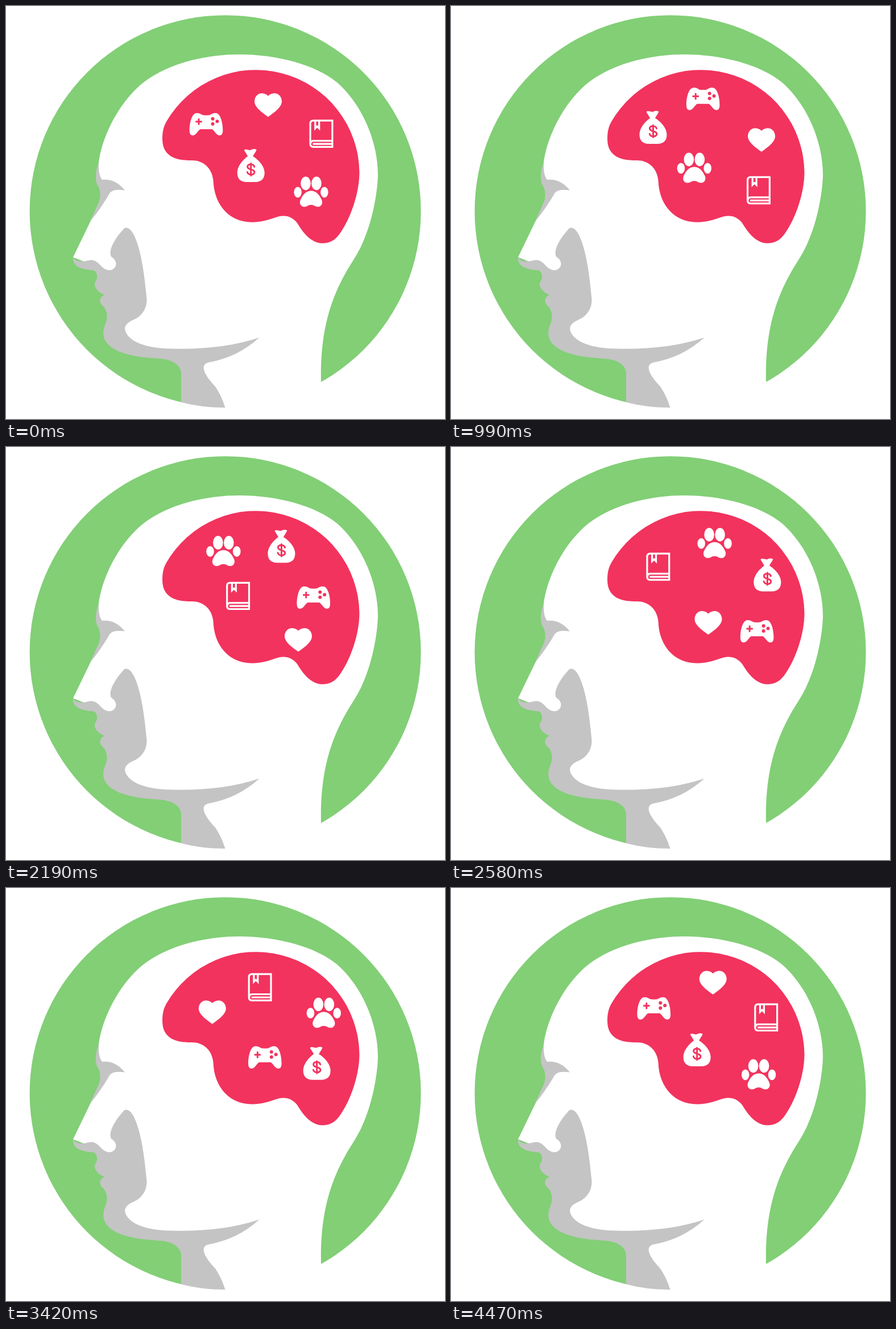
These frames come from a looping animation (772x725 px, 4.5 s). An HTML page:

```html
<!DOCTYPE html>
<html lang="en">
<head>
<meta charset="utf-8">
<title>Thoughts</title>
<style>
html, body { margin: 0; width: 100%; height: 100%; overflow: hidden; background: #fff; }
svg { display: block; width: 100vw; height: 100vh; }
.green { fill: #82cf76; }
.grey { fill: #c4c4c4; }
.pink { fill: #f2335e; }
.white { fill: #fff; }
.line { fill: none; stroke: #fff; stroke-width: 3.2; }
.cut { fill: none; stroke: #f2335e; stroke-width: 3; stroke-linecap: round; }
</style>
</head>
<body>
<svg viewBox="0 0 772 725">
  <circle class="green" cx="385.6" cy="360.2" r="344"/>

  <!-- head; the shadows finish its profile -->
  <path class="white" d="M554 725V660C552 570 571 508 609 449C643 400 654 325 654 295
    C653 229 621 168 582 134C540 100 470 85 410 85C350 85 285 101 242 134C195 171 167 237 163 275
    V300L168 335L149 377L118 441L170 462L200 540V598L300 612L312 640V725Z"/>

  <!-- shadows -->
  <path class="grey" d="M163 275C157 290 156 308 162 316C167 325 166 337 164 343L148 378
    C160 364 173 345 182 329C187 322 197 322 209 323.5C198 310 185 303 169 305C163 298 163 285 163 275Z"/>
  <path class="grey" d="M118 441C122 449 132 450 143 447C158 443 163 453 170 459
    C178 466 188 465 192 458C196 450 191 444 185 440C181 432 186 420 193 409C199 400 203 396 208 390
    C214 387 220 392 225 402C238 428 244 475 247.500 515C248 532 238 545 224 551C212 556 207 563 210 571
    C217 590 248 601 290 601.500C350 603 400 597 445.500 582C420 605 390 620 355 626
    C342 630 346 645 368 668C376 680 381 691 385.500 705C358 705 332 702 308 695.500V645
    C308 632 295 620 268 619C240 617 201 613 183 597C170 586 169 574 174 560C179 549 179 538 172 528
    C163 522 163 512 173 507C160 501 153 492 157 484C162 478 161 467 154 464C140 463 116 460 118 441Z"/>

  <!-- brain -->
  <path class="pink" d="M282 203A182 182 0 0 1 621.500 292C621.500 328 606 374 586 401
    C577 413 567 416.500 556 416.500C536 416 522 397 514 384C507 372 496 368 487 368.500
    C477 369 473 372 465 374C453 378 443 379.500 431 379.500C395 379 366 352 364.500 306
    C362 284 347 271 327 271C300 271.500 275 265 275 233C275 221 277 212 282 203Z"/>

  <g id="game">
    <path class="white" d="M-17 -19.500C-13 -20 -10 -18.500 -7 -16.500C-3.500 -15.300 3.500 -15.300 7 -16.500
      C10 -18.500 13 -20 17 -19.500C26 -19 29.300 0 29.300 10C29.300 16 28 19.700 23.500 19.700
      C18 19.700 15 12 10.500 8.800H-10.500C-15 12 -18 19.700 -23.500 19.700
      C-28 19.700 -29.300 16 -29.300 10C-29.300 0 -26 -19 -17 -19.500Z"/>
    <path class="cut" stroke-width="4" d="M-17.500 -4.500H-8.500M-13 -9V0"/>
    <g class="pink">
      <circle cx="11.500" cy="-9.500" r="3"/>
      <circle cx="19.400" cy="-5" r="3"/>
      <circle cx="11.500" cy="-.6" r="3"/>
    </g>
  </g>

  <g id="heart">
    <path class="white" d="M0 20.700C-6 16 -24 5 -24 -6.500C-24 -15 -18 -20.700 -11.500 -20.700
      C-6.500 -20.700 -2 -18.500 0 -16C2 -18.500 6.500 -20.700 11.500 -20.700
      C18 -20.700 24 -15 24 -6.500C24 5 6 16 0 20.700Z"/>
  </g>

  <g id="book" class="line">
    <path d="M19.400 23.100V-23.100H-14Q-19.400 -23.100 -19.400 -17.500V17.500Q-19.400 23.100 -14 23.100Z"/>
    <path d="M-19 18Q-19 12.300 -14 12.300H20M-15 17.800H20M-10.700 -23V-9.500L-7.200 -13L-3.800 -9.500V-23"/>
  </g>

  <g id="paw" class="white">
    <ellipse cx="-9.500" cy="-14.600" rx="8.800" ry="11.900"/>
    <ellipse cx="9.500" cy="-14.600" rx="8.800" ry="11.900"/>
    <ellipse cx="-23.400" cy=".8" rx="6.800" ry="9.400"/>
    <ellipse cx="23.400" cy=".8" rx="6.800" ry="9.400"/>
    <path d="M0 -1.500C9 -1.500 14 5 18 13C22 20 18 26.500 12 26.500C7 26.500 5 23 0 23
      C-5 23 -7 26.500 -12 26.500C-18 26.500 -22 20 -18 13C-14 5 -9 -1.500 0 -1.500Z"/>
  </g>

  <g id="bag">
    <path class="white" d="M-12 -27C-9 -30 -5 -27 -1 -27C3 -29 6 -30 10 -27.500C8 -23 5 -20 3.500 -16
      C11 -12 24 0 24 13C24 24 17 29 8 29H-8C-17 29 -24 24 -24 13C-24 0 -12 -12 -5.500 -16
      C-7 -20 -10 -23 -12 -27Z"/>
    <path class="cut" d="M6 2.200C5 -3.200 -6 -3.600 -6 2C-6 8.500 6.300 5.300 6.300 11.800
      C6.300 17.600 -5.600 17.200 -6.300 11.500M0 -3.700V17.700"/>
  </g>
</svg>
<script>
const LOOP = 4500, STEP = 30, LEG = 900, BEND = 0.6;

// Six stops per icon, one leg of time apart
const stops = {
  game: [[352, 207.5], [440.3, 162.8], [523.5, 215.5], [536, 326], [444, 290], [356.5, 211]],
  heart: [[461, 174], [544.6, 232.4], [547, 336], [447, 305], [362, 209], [461, 166]],
  book: [[554.5, 224.3], [542.6, 322.4], [456.2, 296], [364, 206.5], [459, 175], [554.5, 227.3]],
  paw: [[536.5, 326], [431, 286], [348.6, 207.5], [470, 169], [564, 228.5], [541, 327.3]],
  bag: [[430.7, 280], [355.5, 215], [426, 156.5], [560, 229], [539, 312], [432.3, 284]]
};

const ease = f => f * f * (3 - 2 * f);

// Tangent at a stop: follows its neighbours, or the leg itself at both ends
function slope(pts, i, k) {
  const a = pts[i - 1], b = pts[i], c = pts[i + 1];
  if (!a) return c[k] - b[k];
  if (!c) return b[k] - a[k];
  return BEND * (c[k] - a[k]);
}

// Cubic Hermite curve from stop i to the next
function along(pts, i, u, k) {
  const v = 1 - u, w = ease(u);
  return (1 - w) * pts[i][k] + w * pts[i + 1][k]
    + u * v * (v * slope(pts, i, k) - u * slope(pts, i + 1, k));
}

const icons = Object.entries(stops).map(([id, pts]) => [document.getElementById(id), pts]);

function draw(now) {
  const t = Math.floor((now % LOOP) / STEP) * STEP;
  const leg = Math.floor(t / LEG), u = ease(t / LEG - leg);
  for (const [el, pts] of icons) {
    const [x, y] = [0, 1].map(k => along(pts, leg, u, k).toFixed(2));
    el.setAttribute("transform", `translate(${x} ${y})`);
  }
}

let start;
function tick(now) {
  start ??= now;
  draw(now - start);
  requestAnimationFrame(tick);
}
draw(0);
requestAnimationFrame(tick);
</script>
</body>
</html>
```
